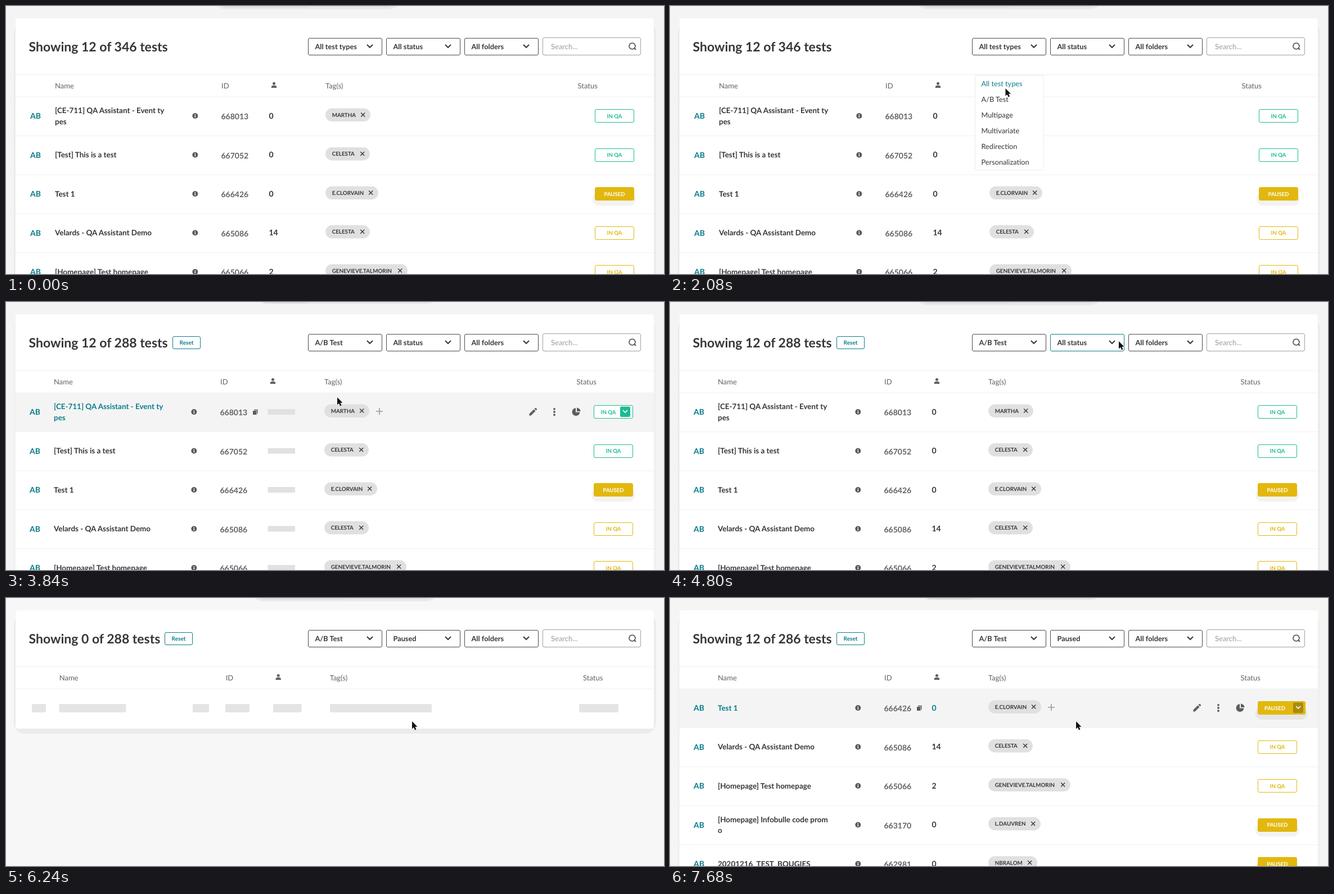
These frames come from a looping animation (1170 px wide and 478 px high, 8000 ms). An HTML page:

```html
<!DOCTYPE html>
<html lang="en">
<head>
<meta charset="utf-8">
<title>Test list filters</title>
<style>
  html, body { margin: 0; width: 100%; height: 100%; overflow: hidden; }
  svg { display: block; width: 1170px; height: 478px; font: 14px Lato, sans-serif; text-rendering: geometricPrecision; }
  .b { font-weight: 700; }
</style>
</head>
<body>
<svg id="stage" viewBox="0 0 1170 478"></svg>
<script>
const LOOP = 8000, STEP = 160, PITCH = 69.5;
const TITLE = 23, BODY = 13.45, CONTROL = 12.75;
const INK = '#363539', GREY = '#626262', TEAL = '#0b7d8b', GREEN = '#1dbb93', GOLD = '#e2b80e';

// name lines, id, visitors, tag, tag width, status, status colour
const TESTS = [
  [['[CE-711] QA Assistant - Event ty', 'pes'], 668013, 0, 'MARTHA', 80, 'IN QA', GREEN],
  [['[Test] This is a test'], 667052, 0, 'CELESTA', 79, 'IN QA', GREEN],
  [['Test 1'], 666426, 0, 'E.CLORVAIN', 94, 'PAUSED', GOLD],
  [['Velards - QA Assistant Demo'], 665086, 14, 'CELESTA', 79, 'IN QA', GOLD],
  [['[Homepage] Test homepage'], 665066, 2, 'GENEVIEVE.TALMORIN', 146, 'IN QA', GOLD],
  [['[Homepage] Infobulle code prom', 'o'], 663170, 0, 'L.DAUVREN', 93, 'PAUSED', GOLD],
  [['20201216_TEST_BOUGIES'], 662981, 0, 'NBRALOM', 87, 'PAUSED', GOLD]
];
const TYPES = ['All test types', 'A/B Test', 'Multipage', 'Multivariate', 'Redirection', 'Personalization'];
const STATUSES = ['All status', 'Draft', 'In QA', 'Paused', 'Running', 'Archived'];

// time, x, y of the pointer
const POINTER = [
  [160, 668, -20], [960, 620, 75], [1120, 618, 81], [1440, 618, 81], [2400, 589, 170],
  [3840, 589, 170], [4800, 798, 70], [5120, 798, 70], [5760, 722, 220], [LOOP, 722, 220]
];

const ease = k => k * k * (3 - 2 * k);
const clamp = k => Math.max(0, Math.min(1, k));
const between = (t, a, b) => t >= a && t < b;

const rect = (x, y, w, h, fill, rx = 0, stroke = 'none') =>
  `<rect x="${x}" y="${y}" width="${w}" height="${h}" rx="${rx}" fill="${fill}" stroke="${stroke}"/>`;
const text = (x, y, s, size, fill, bold = true, anchor = 'start') =>
  `<text x="${x}" y="${y}" font-size="${size}" fill="${fill}" text-anchor="${anchor}"${bold ? ' class="b"' : ''}>${s}</text>`;
const line = (d, color, width = 1) =>
  `<path d="${d}" fill="none" stroke="${color}" stroke-width="${width}"/>`;
const shape = (d, fill, extra = '') => `<path d="${d}" fill="${fill}" ${extra}/>`;
const dot = (x, y, r, fill) => `<circle cx="${x}" cy="${y}" r="${r}" fill="${fill}"/>`;
const rule = y => rect(17, y, 1135, 1, '#f0f0f0');
const chevron = (x, y, r, color, width) => line(`M${x - r} ${y - r / 2}l${r} ${r} ${r} ${-r}`, color, width);

function pointerAt(t) {
  const i = POINTER.findIndex(k => k[0] > t);
  if (i < 1) return { x: POINTER[0][1], y: -40 };
  const [t0, x0, y0] = POINTER[i - 1], [t1, x1, y1] = POINTER[i];
  const k = ease((t - t0) / (t1 - t0));
  return { x: x0 + (x1 - x0) * k, y: y0 + (y1 - y0) * k };
}

function topShadow(t, thin) {
  if (thin) return rect(446, -30, 321, 33, '#e6e6e6', 16) + rect(452, -30, 92, 33, '#dedede', 12);
  const x = 366 + 67 * ease(clamp(t / 960));
  return rect(x, -40, 338, 46, '#e9e9e9', 26) + rect(x + 12, -30, 170, 33, '#dfdfdf', 14) +
    rect(x + 12, -30, 314, 32, '#dfdfdf', 14);
}

function select(x, label, active) {
  return rect(x + .5, 57.5, 131, 30, '#fff', 2.5, active ? TEAL : '#4b4a4e') +
    text(x + 12.5, 76.5, label, CONTROL, INK) + chevron(x + 110, 71.5, 5, INK, 2);
}

function menu(x, items, p) {
  const hot = Math.floor((p.y - 124) / 28);
  return rect(x + .5, 123.5, 122, 169, '#fff', 2, '#ececec') +
    items.map((s, i) => text(x + 11.5, 142.5 + 28 * i, s, CONTROL, i === hot ? TEAL : INK, false)).join('');
}

function toolbar(count, total, reset, type, status, statusActive) {
  const rx = count ? 296 : 282;
  return text(40.5, 81, `Showing ${count} of ${total} tests`, TITLE, INK) +
    (reset ? rect(rx + .5, 61.5, 49, 22, '#fff', 2.5, TEAL) + text(rx + 25, 76, 'Reset', 10, TEAL, true, 'middle') : '') +
    select(537, type) + select(676, status, statusActive) + select(815, 'All folders') +
    rect(954.5, 56.5, 174, 31, '#fff', 2.5, '#a0a0a0') + text(969, 77, 'Search...', 13, '#9a9a9a', false) +
    `<circle cx="1113.5" cy="71.5" r="5.4" fill="none" stroke="#555" stroke-width="1.7"/>` +
    line('M1117 75l3 3', '#555', 2);
}

function headings(dx, statusX) {
  const label = (x, s) => text(x, 147, s, 13, GREY, false);
  return rule(122) + rule(161.5) + label(85 + dx, 'Name') + label(381 + dx, 'ID') +
    label(566 + dx, 'Tag(s)') + label(statusX, 'Status') + dot(474.5 + dx, 138.3, 2.5, GREY) +
    shape(`M${469.8 + dx} 146v-1.5q0-3 4.7-3t4.7 3v1.5z`, GREY);
}

function skeleton() {
  const bars = [[46, 25], [94.5, 119], [332, 29], [390, 43], [475, 50.5], [576, 181], [1019, 70]];
  return headings(9.7, 1026) + bars.map(([x, w]) => rect(x, 189, w, 15, '#e4e4e4', 2)).join('');
}

function badge(c, label, color, hot) {
  const solid = label === 'PAUSED', w = hot && solid ? 85 : 70;
  const top = Math.round(c - 12) + .5, bx = hot && solid ? 1108 : 1092;
  let s = solid ? rect(1041, c - 2, w + 7, 23, hot ? '#e6e6e6' : '#f3f3f3', 11) : '';
  s += rect(1045.5, top, w - 1, 23, solid ? color : '#fff', 2.5, color);
  s += text(hot ? (solid ? 1075.5 : 1071) : 1080, c + 3.7, label, 9.6, solid ? '#fff' : color, true, 'middle');
  if (hot) s += rect(bx, c - 9.5, 18, 18.5, solid ? '#a78a12' : color, 2) + chevron(bx + 9, c - 1, 4, '#fff', 1.7);
  return s;
}

function hoverTools(c, tagEnd) {
  const px = tagEnd + 18, ink = '#5d5d5d';
  return rect(439, c - 2, 6.5, 7, ink) + line(`M441 ${c - 3.5}h6v6.5`, ink, 1.3) +
    line(`M${px - 6} ${c - 1}h12m-6 -6v12`, '#999', 1.6) +
    shape(`M930.5 ${c + 6.5}v-3l8-8 3 3-8 8zM939.5 ${c - 5.5}l1.5-1.3q.8-.6 1.5 0l1.3 1.4q.7.7 0 1.5l-1.3 1.4z`, ink) +
    [-5.2, 0, 5.2].map(d => dot(975, c + d, 1.9, ink)).join('') +
    shape(`M1013 ${c - 7}v7.5h7.5a7 7 0 1 1-7.5-7.5z`, ink) +
    shape(`M1015 ${c - 7.5}a7 7 0 0 1 6.5 6.5h-6.5z`, ink);
}

function row([name, id, visitors, tag, tagW, status, color], i, hot, counting, dx) {
  const c = 196 + PITCH * i, y = c + 4.5 - (name.length - 1) * 9.5, tx = 566;
  const cx = tx + tagW - 13.3, cy = c - 2;
  const parts = [
    text(42 - dx / 2, c + 5, 'AB', 14, TEAL),
    ...name.map((s, n) => text(85, y + 19.5 * n, s, BODY, hot ? TEAL : INK)),
    dot(334.3, c, 5, '#5a5a5a'), rect(333.6, c - .8, 1.5, 3.6, '#fff'), rect(333.6, c - 3, 1.5, 1.5, '#fff'),
    text(380.5, c + 6, id, 14, GREY),
    counting ? rect(465.5, c - 5, 48.5, 10, '#e1e1e1')
             : text(465.5, c + 4.8, visitors, 14, hot ? TEAL : INK),
    rect(tx, c - 13.5, tagW, 23.5, '#e0e0e0', 11.7),
    text(tx + 11.7, c + 1.8, tag, 9.8, INK),
    line(`M${cx - 3.5} ${cy - 3.5}l7 7m0 -7l-7 7`, INK, 1.4),
    badge(c, status, color, hot),
    hot ? hoverTools(c, tx + tagW) : ''
  ];
  return (hot ? rect(17, 162, 1135, 70, '#f4f4f4') : '') + rule(231 + PITCH * i) +
    `<g transform="translate(${dx})">${parts.join('')}</g>`;
}

function arrow({ x, y }) {
  return shape(`M${x} ${y}v13.5l3-2.8 2.2 4.8 2.4-1.1-2.2-4.7h4.2z`, '#111',
    'stroke="#fff" stroke-width="1.2" paint-order="stroke"');
}

function textCursor({ x, y }) {
  const d = `M${x - 4} ${y - 7}q4 0 4 2v10q0 2-4 2M${x + 4} ${y - 7}q-4 0-4 2M${x + 4} ${y + 7}q-4 0-4-2M${x - 2} ${y + 1}h4`;
  return line(d, '#fff', 2.6) + line(d, '#222', 1.2);
}

function draw(t) {
  const p = pointerAt(t);
  const loading = between(t, 2720, 3840) || between(t, 6240, 7200);
  const counting = between(t, 3840, 4160) || between(t, 7200, 7360);
  const typed = t >= 2720, paused = t >= 6240;
  const typeMenu = between(t, 1280, 2720), statusMenu = between(t, 4960, 6240);
  const thin = between(t, 3840, 4160) || t >= 7200;
  const total = t < 3840 ? 346 : t < 7200 ? 288 : 286;
  const bottom = loading ? 233 : 520;
  const dx = typed ? 0 : 2;

  let s = rect(0, 0, 1170, 478, loading ? '#f7f7f7' : t >= 7200 ? '#f5f5f3' : '#f4f4f4');
  s += topShadow(t, thin);
  s += rect(14, 28, 1142, bottom + 9 - 28, thin ? '#f0f0f0' : '#ebebeb', 20);
  s += rect(17, 22, 1135, bottom - 22, '#fff', 4);
  s += toolbar(loading ? 0 : 12, total, typed, TYPES[+typed], paused ? 'Paused' : 'All status', between(t, 4640, 6240));

  if (loading) s += skeleton();
  else {
    const rows = paused ? TESTS.slice(2) : TESTS.slice(0, 5);
    const hovered = typeMenu || statusMenu ? -1 : Math.floor((p.y - 162) / PITCH);
    s += headings(dx, 1014.5 + dx);
    s += rows.map((r, i) => row(r, i, i === hovered, counting, dx)).join('');
  }
  if (typeMenu) s += menu(542, TYPES, p);
  if (statusMenu) s += menu(681, STATUSES, p);
  s += between(t, 800, 1600) ? textCursor(p) : arrow(p);
  stage.innerHTML = s;
}

const stage = document.getElementById('stage');
let shown = -1;
function tick() {
  const t = Math.floor(performance.now() % LOOP / STEP) * STEP;
  if (t !== shown) draw(shown = t);
  requestAnimationFrame(tick);
}
tick();
</script>
</body>
</html>
```
